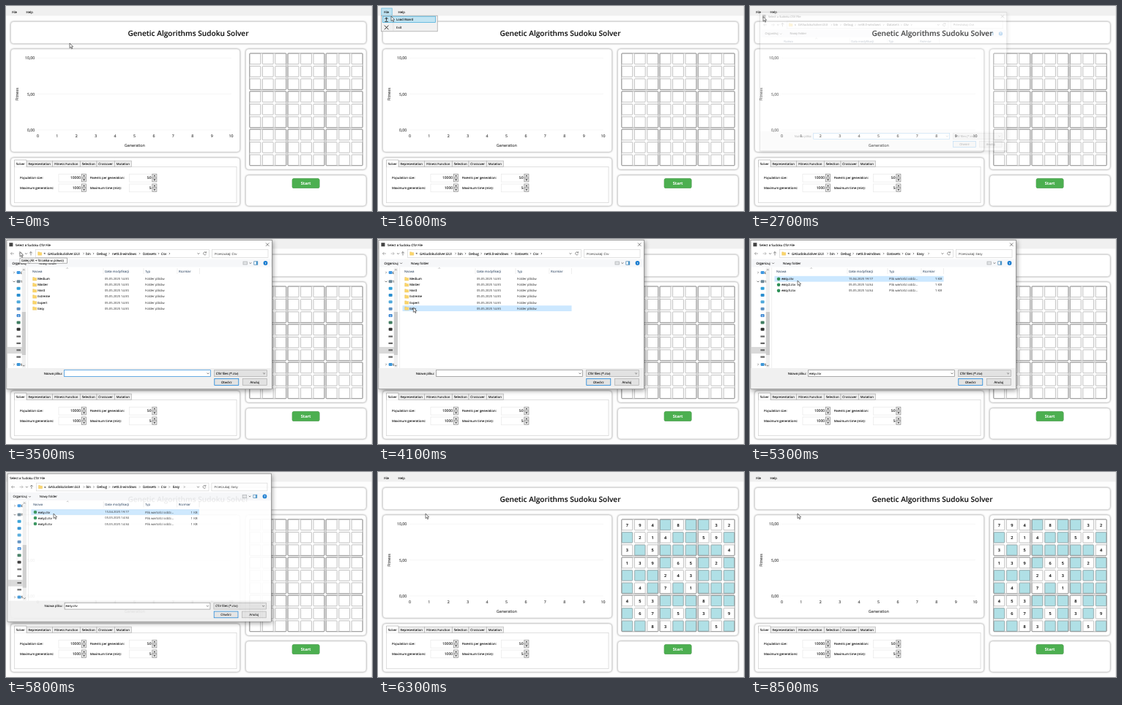
These frames come from a looping animation (500 by 281 pixels, 8.8 s). An HTML page:

```html
<!DOCTYPE html>
<html lang="en">
<head>
<meta charset="utf-8">
<title>Genetic Algorithms Sudoku Solver</title>
<style>
html, body { margin: 0; width: 100%; height: 100%; overflow: hidden; background: #fdfdfd; }
svg { display: block; width: 100%; height: 100%; }
text { font-family: "Open Sans", "Noto Sans", sans-serif; fill: #111; stroke: #111; stroke-width: .1;
  white-space: pre; text-rendering: geometricPrecision; }
.light { fill: #fff; stroke: none; }
.soft { opacity: .68; }
.axis { opacity: .86; }
.head { fill: #4a5f78; stroke: #4a5f78; }
.card { fill: #fff; stroke: #cfcfcf; stroke-width: .6; filter: drop-shadow(.7px .8px .9px rgba(0,0,0,.38)); }
.frame { filter: drop-shadow(1px 2px 3px rgba(0,0,0,.4)); }
#dialog { transform-origin: 182px 103px; }
</style>
</head>
<body>
<svg id="stage" viewBox="0 0 500 281" preserveAspectRatio="none"></svg>
<script>
const LOOP = 8800, STEP = 100;

const rect = (x, y, w, h, fill, stroke = "none", extra = "") =>
  `<rect x="${x}" y="${y}" width="${w}" height="${h}" fill="${fill}" stroke="${stroke}" stroke-width=".7" ${extra}/>`;
const line = (d, stroke, width = .7, fill = "none") =>
  `<path d="${d}" stroke="${stroke}" stroke-width="${width}" fill="${fill}"/>`;
// y is the middle of the line of text
const text = (x, y, s, size = 4.3, anchor = "start", extra = "") =>
  `<text x="${x}" y="${y + size * .36}" font-size="${size}" text-anchor="${anchor}" ${extra}>${s}</text>`;
const group = (id, body) => `<g id="${id}">${body}</g>`;
const card = (x, y, w, h) => `<rect class="card" x="${x}" y="${y}" width="${w}" height="${h}" rx="4"/>`;
const chevron = (x, y) => line(`M${x - .6} ${y - 1.2}l1.2 1.2l-1.2 1.2`, "#444", .6);
const drop = (x, y) => line(`M${x - 1.4} ${y - .7}l1.4 1.4l1.4 -1.4`, "#444", .7);
const SOFT = 'class="soft"', AXIS = 'class="axis"';

function chart() {
  let s = card(6.5, 59, 313, 141);
  ["10,00", "5,00", "0,00"].forEach((label, i) => {
    const y = 71.3 + i * 49.3;
    s += line(`M43 ${y}H308`, "#f0f0f0", .6) + text(39.3, y, label, 5.3, "end", AXIS);
  });
  for (let i = 0; i <= 10; i++) s += text(43.4 + i * 26.42, 178.3, i, 5.3, "middle", AXIS);
  s += text(175.8, 191, "Generation", 5.35, "middle", AXIS);
  return s + text(0, 0, "Fitness", 5.4, "middle", AXIS + ' transform="translate(15 121) rotate(-90)"');
}

function spinner(label, lx, x, y, value) {
  let s = text(lx, y, label) + rect(x, y - 5.3, 31, 10.8, "#fff", "#e8e8e8");
  s += text(x + 30.2, y, value, 5, "end");
  [-1, 1].forEach(k => {
    const cy = y + k * 2.8;
    s += rect(x + 31.6, cy - 2.5, 6, 5, "#eee", "#8a8a8a");
    s += line(`M${x + 33} ${cy - k * .8}h3.2l-1.6 ${k * 1.8}z`, "none", 0, "#222");
  });
  return s;
}

function settings() {
  let s = card(6.5, 208, 313, 66) + rect(11.5, 220.3, 303.5, 49.4, "#fff", "#d2d2d2");
  const tabs = [["Representation", 28, 63.5], ["Fitness Function", 63.5, 101.3], ["Selection", 101.3, 124],
    ["Crossover", 124, 148.3], ["Mutation", 148.3, 171.3]];
  tabs.forEach(([name, a, b]) => s += rect(a, 212.2, b - a, 8.1, "#efefef", "#b4b4b4")
    + text((a + b) / 2, 216.4, name, 4.25, "middle"));
  s += line("M11.5 220.5V211H28V220.5", "#b4b4b4", .7, "#fff") + text(19.8, 216, "Solver", 4.25, "middle");
  s += spinner("Population size:", 19, 72, 235.6, "10000") + spinner("Maximum generations:", 19, 72, 249.3, "1000");
  return s + spinner("Parents per generation:", 114.7, 168.3, 235.6, "50")
    + spinner("Maximum time (min):", 114.7, 168.3, 249.3, "5");
}

const PUZZLE = ["794.8..32", ".214..59.", "3.5.....4", "139.65.2.", "...243...", ".4.7.1...",
  "453...8..", ".67.5.3.9", "..83...5."];

function board() {
  let cells = "", clues = "", blocks = "";
  PUZZLE.forEach((row, r) => [...row].forEach((ch, c) => {
    const x = 333 + c * 17.4, y = 65.1 + r * 17.35;
    cells += rect(x, y, 14.8, 14.6, "#fff", "#a6a6a6", 'rx=".8"');
    clues += ch === "." ? rect(x + .3, y + .3, 14.2, 14, "#b0e0e6", "#8fa9ad", 'rx=".8"')
      : text(x + 7.4, y + 7.6, ch, 5.6, "middle", 'font-weight="600"');
    if (r % 3 === 0 && c % 3 === 0) blocks += rect(x - .3, y - .3, 50.2, 49.9, "none", "#858585", 'rx="1"');
  }));
  return card(327.5, 59, 164.5, 165) + cells + group("clues", clues) + blocks;
}

function page() {
  return rect(0, 0, 500, 281, "#fdfdfd") + rect(0, 0, 500, 13.4, "#f0f0f0") + line("M499.6 0V281", "#dcdcdc")
    + rect(4.8, 3, 14.4, 10.2, "#bfe3f1", "#62b6da", 'id="fileHot"')
    + text(8.2, 8, "File") + text(27.5, 8, "Help")
    + card(6.5, 21.5, 485.5, 30) + text(249, 37, "Genetic Algorithms Sudoku Solver", 10.1, "middle", 'font-weight="600"')
    + chart() + settings() + board() + card(327.5, 232, 164.5, 42)
    + `<g filter="drop-shadow(.3px .6px .7px rgba(0,0,0,.45))">${rect(390.8, 236.2, 37.6, 13.6, "#4caf50", "none", 'rx="2.6"')}</g>`
    + text(409.6, 243.1, "Start", 5.6, "middle", 'font-weight="700" class="light"');
}

function menu() {
  return rect(4.6, 13.2, 76.6, 21.6, "#f1f1f1", "#a0a0a0") + line("M20.8 14V34", "#d8d8d8", .5)
    + rect(6.4, 14.2, 72, 8.4, "#c1e4f2", "#3fabd9", 'id="loadHot"')
    + line("M11.5 20.4V16M9.4 18l2.1 -2.2l2.1 2.2M9.2 21.3h4.6", "#222", .9)
    + line("M8.8 26.6l5.6 5.6m0 -5.6l-5.6 5.6", "#222", .9)
    + text(25, 18.5, "Load Board") + text(25, 29.5, "Exit");
}

const FOLDERS = ["Medium", "Master", "Hard", "Extreme", "Expert", "Easy"];
const FILES = [["easy.csv", "15.04.2025 19:17"], ["easy2.csv", "05.05.2025 14:34"], ["easy3.csv", "05.05.2025 14:34"]];
const rowY = i => 54.7 + i * 8.08;

const folderIcon = (x, y) => line(`M${x} ${y - 2.2}h2l.7 .8h2.5v3.6h-5.2z`, "#e3b341", .3, "#fbd56b");
const sheetIcon = (x, y) => `<circle cx="${x + 2.5}" cy="${y}" r="2.3" fill="#2f9158"/>`;

function row(i, name, date, type, icon) {
  const y = rowY(i);
  return icon(36.6, y) + text(43.2, y, name) + text(135, y, date, 4.15, "start", SOFT)
    + text(190, y, type, 4.3, "start", SOFT);
}

function sidebar() {
  const tints = ["#3f97e0", "#6d8796", "#2f9fd8", "#2b8fd0", "#4fa9dc", "#5b8fc0", "#2f7fd0", "#3f7c60", "#333"];
  let s = rect(2, 148, 20, 9, "#d9d9d9");
  for (let i = 0; i < 13; i++) {
    const y = i === 0 ? 46 : 58.3 + (i - 1) * 9.35;
    s += i < 9 ? rect(14.6, y - 2, 5, 4, tints[i], "none", 'rx="1"') : rect(14.4, y - .6, 5.6, 2.2, "#666");
    if (i === 6) s += line(`M17.1 ${y - 1.4}v2.6m-1.2 -1.1l1.2 1.2l1.2 -1.2`, "#fff", .6);
  }
  s += rect(14.6, 170, 5, 4, "#3d95d6", "none", 'rx="1"') + chevron(11, 46) + drop(11, 58.3) + chevron(11, 172);
  s += text(19.9, 46, "C") + text(19.9, 58.3, "T") + text(19.9, 172, "S");
  s += rect(21.8, 39.5, 5.2, 137, "#f0f0f0") + rect(21.8, 100, 5.2, 59, "#cdcdcd");
  s += line("M22.9 43l1.4 -1.4l1.4 1.4", "#555", .6) + drop(24.3, 173.5);
  return s + line("M29.6 39V177", "#e4e4e4", .6);
}

function crumbs() {
  const list = [["GASudokuSolver.GUI", 57, 106], ["bin", 109, 119.5], ["Debug", 124, 141],
    ["net8.0-windows", 145, 182.6], ["Datasets", 187, 208.5], ["Csv", 212, 223.4]];
  let s = folderIcon(43.6, 20) + text(51.5, 19.8, "«", 4.5);
  list.forEach(([name, x, end]) => s += text(x, 20, name, 4.5) + chevron(end, 20));
  return s;
}

function button(x, label, edge) {
  return rect(x, 191.6, 33, 8.8, "#e2e2e2", edge) + text(x + 16.5, 196, label, 4.3, "middle");
}

function dialog() {
  let s = `<rect class="frame" x="1" y="1.6" width="362.5" height="204" fill="#fff" stroke="#777" stroke-width=".7"/>`;
  s += group("controls", rect(4.4, 5.2, 5, 5, "#444") + line("M355 5.4l4.4 4.4m0 -4.4l-4.4 4.4", "#333", .6));
  s += text(12.8, 8, "Select a Sudoku CSV File", 4.3, "start", 'id="caption"');
  s += line("M11 20H6.4m1.9 -1.9l-1.9 1.9l1.9 1.9", "#777", .6) + line("M17.6 20h4.6m-1.9 -1.9l1.9 1.9l-1.9 1.9", "#999", .6);
  s += drop(27.5, 20) + line("M34 22.5v-5m-1.9 1.9l1.9 -1.9l1.9 1.9", "#444", .6);
  s += rect(40.5, 14.6, 237, 10.8, "#fff", "#d6d6d6") + crumbs() + drop(263, 20);
  s += line("M273.2 18.6a2 2 0 1 0 .3 2M273.5 17.2v1.7h-1.7", "#555", .6);
  s += rect(281.5, 14.6, 76.5, 10.8, "#fff", "#d6d6d6");
  s += rect(2, 27.5, 361, 11, "#f6f7f9") + text(8.4, 33, "Organizuj") + drop(31.6, 33.3) + text(45, 33, "Nowy folder");
  s += rect(324, 31, 5.6, 4, "#e2e4e6", "#a9adb1") + drop(334, 33) + rect(338.8, 30.8, 5, 4.4, "#fff", "#3f7fae")
    + rect(341.8, 30.8, 2, 4.4, "#3f8fc8");
  s += `<circle cx="354.5" cy="33" r="2.9" fill="#1479cf"/>` + text(354.5, 33, "?", 4.2, "middle", 'class="light" font-weight="700"');
  s += group("sidebar", sidebar());
  [["Nazwa", 36], ["Data modyfikacji", 135], ["Typ", 190], ["Rozmiar", 236]]
    .forEach(([h, x]) => s += text(x, 44, h, 4.3, "start", 'class="head"'));
  s += line("M133 40V48M188 40V48M234 40V48M264.5 40V48", "#e3e3e3", .6);
  s += line("M82.4 40.6l1.3 -1.1l1.3 1.1", "#777", .5);
  s += rect(33.5, 50.8, 231, 7.8, "#e5f3ff", "none", 'id="rowHot"');
  s += group("folders", FOLDERS.map((n, i) => row(i, n, "05.05.2025 14:35", "Folder plików", folderIcon)).join(""));
  s += group("files", FILES.map(([n, d], i) => row(i, n, d, "Plik wartości oddz...", sheetIcon)
    + text(262, rowY(i), "1 KB", 4.3, "end", SOFT)).join(""));
  s += group("inCsv", text(285, 20, "Przeszukaj: Csv", 4.3, "start", SOFT));
  s += group("inEasy", text(285, 20, "Przeszukaj: Easy", 4.3, "start", SOFT) + text(228, 20, "Easy", 4.5) + chevron(244, 20));
  s += rect(1.4, 177, 361.7, 28.2, "#f0f0f0") + text(77, 184.2, "Nazwa pliku:", 4.3, "end");
  s += rect(79.5, 179.7, 200, 8.9, "#fff", "#8a8a8a", 'id="nameBox"') + drop(276, 184.2);
  s += group("fileName", text(81, 184.2, "easy.csv"));
  s += rect(284.5, 179.7, 72, 8.9, "#e2e2e2", "#adadad") + text(287, 184.2, "CSV files (*.csv)") + drop(352.6, 184.2);
  return s + button(284.8, "Otwórz", "#0078d7") + button(323.3, "Anuluj", "#adadad");
}

const tip = () => rect(19, 26, 64.5, 7.2, "#fff", "#8c8c8c") + text(21, 29.5, "Dalej (Alt + Strzałka w prawo)", 4.3);

const stage = document.getElementById("stage");
stage.innerHTML = page() + group("menu", menu()) + group("dialog", dialog()) + group("tip", tip())
  + group("cursor", line("M0 0V6.6L1.6 5.2L2.7 7.7L3.7 7.2L2.6 4.8H4.6Z", "#222", .6, "#fff"));
const $ = id => document.getElementById(id);
const fade = (id, o) => $(id).setAttribute("opacity", +o);

// [time, x, y] of the pointer tip; no place means hidden
const POINTER = [[0, 87, 51], [300, 74, 46.5], [400], [800, 11, 7], [900, 12, 8], [1000, 12, 8.2],
  [1300, 13, 9], [1400, 15, 11], [1500, 17, 13], [1600, 18, 14], [1700, 18, 14.5], [3300, 19, 17.5],
  [3600, 21, 24], [3700, 28, 46], [3800, 38, 70], [3900, 45, 88], [4000, 48.3, 93.8],
  [4800, 51, 87], [4900, 56, 74], [5000, 61, 63], [5100, 64, 58.5], [5200, 65, 57]];
// [time, opacity, scale] of the file dialog
const DIALOG = [[0, 0, 1], [2700, .25, .93], [2800, .8, .98], [2900, 1, 1], [5700, .98, .998],
  [5800, .93, .994], [5900, .35, .95], [6000, 0, .9]];
const at = (table, t) => table.filter(k => k[0] <= t).pop();

function draw(t) {
  const on = (id, a, b) => fade(id, t >= a && t < b);
  const [, x, y] = at(POINTER, t);
  fade("cursor", x !== undefined);
  if (x !== undefined) $("cursor").setAttribute("transform", `translate(${x} ${y})`);

  on("fileHot", 800, 2200);
  fade("menu", t >= 1200 && t < 2100 ? 1 : t === 2100 ? .5 : 0);
  on("loadHot", 1500, 2200);

  const [, o, k] = at(DIALOG, t);
  fade("dialog", o);
  $("dialog").style.transform = `scale(${k})`;
  // a closing window loses its icon and close button
  on("controls", 0, 5600);
  $("caption").setAttribute("x", t < 5600 ? 12.8 : 4.2);
  on("sidebar", 3000, LOOP);
  on("folders", 3000, 4300);
  on("files", 4400, LOOP);
  on("inCsv", 0, 4300);
  on("inEasy", 4300, LOOP);
  on("tip", 3400, 3600);
  on("fileName", 5300, LOOP);
  $("nameBox").setAttribute("stroke", t < 4100 ? "#2a8bdb" : "#8a8a8a");

  const i = Math.floor((y - rowY(0) + 4) / 8.08);
  const count = t < 4300 ? FOLDERS.length : t < 4400 ? 0 : FILES.length;
  const picked = (t >= 4100 && t < 4300) || t >= 5300;
  fade("rowHot", t >= 3600 && i >= 0 && i < count);
  $("rowHot").setAttribute("y", rowY(Math.max(0, i || 0)) - 3.9);
  $("rowHot").setAttribute("fill", picked ? "#cce8ff" : "#e5f3ff");

  on("clues", 6200, LOOP);
}

const start = performance.now();
function tick() {
  const t = (performance.now() - start) % LOOP;
  draw(Math.floor(t / STEP) * STEP);
  requestAnimationFrame(tick);
}
tick();
</script>
</body>
</html>
```
